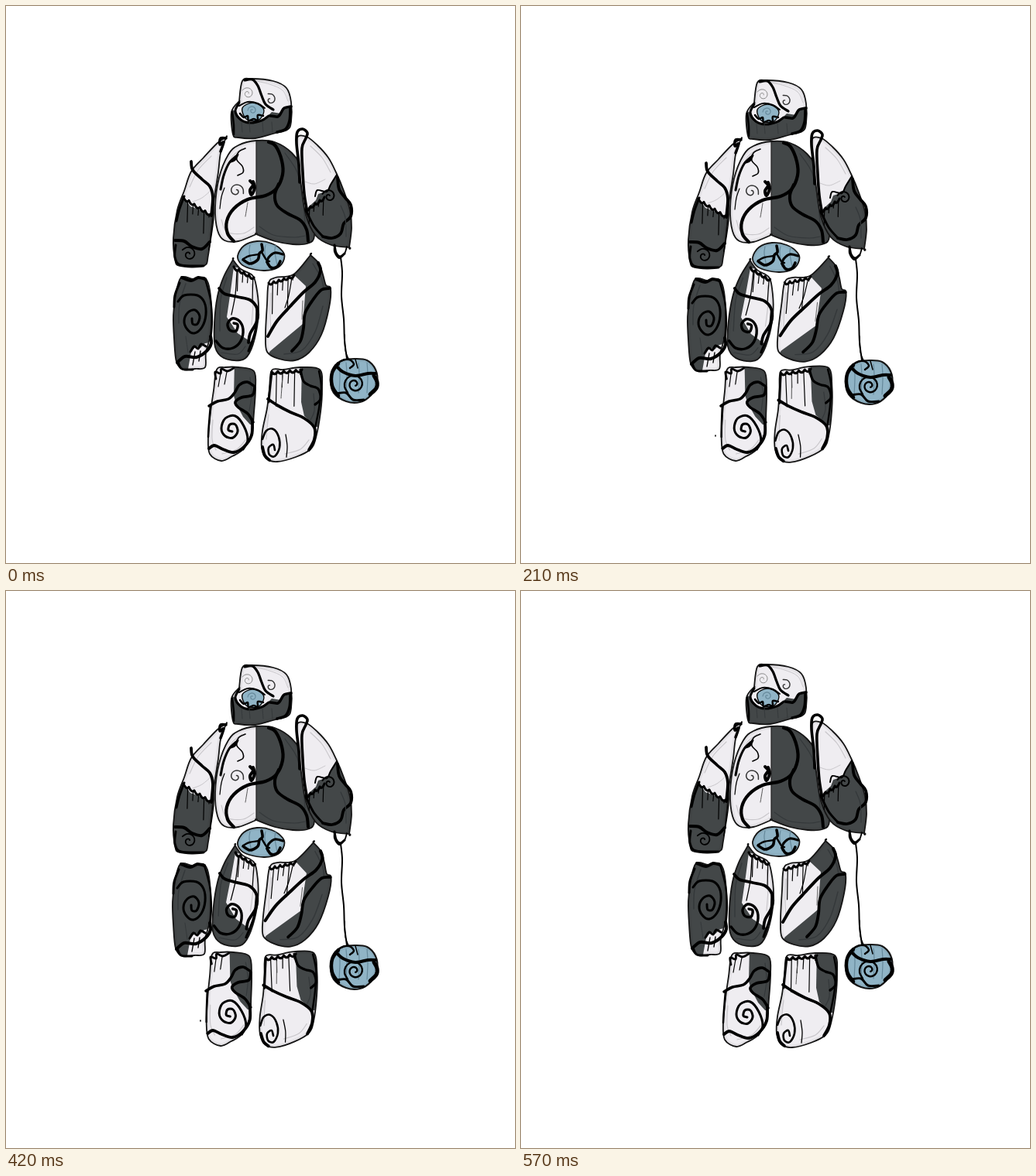
These frames come from a looping animation (657x720 px, 600 ms). An HTML page with a canvas:

```html
<!DOCTYPE html>
<html lang="en">
<head>
<meta charset="utf-8">
<title>Armour idle</title>
<style>
  html, body { margin: 0; width: 100%; height: 100%; overflow: hidden; background: #fff; }
  canvas { display: block; }
</style>
</head>
<body>
<canvas id="stage" width="657" height="720"></canvas>
<script>
const ctx = document.getElementById('stage').getContext('2d');
const WHITE = '#efedf1', DARK = '#434748', BLUE = '#90b4c6', INK = '#000';
const GREY = '#c9c7cb', SHADE = '#34383a', STEEL = '#66899b';
const LOOP = 600, RAD = Math.PI / 180;

const points = s => s.split(' ').map(p => p.split(',').map(Number));

// Smooth path through the given points; a doubled point makes a corner.
function curve(pts, closed) {
  const path = new Path2D(), n = pts.length;
  const at = i => closed ? pts[(i + n) % n] : pts[Math.max(0, Math.min(n - 1, i))];
  path.moveTo(...pts[0]);
  for (let i = 0; i < (closed ? n : n - 1); i++) {
    const [a, b, c, d] = [at(i - 1), at(i), at(i + 1), at(i + 2)];
    path.bezierCurveTo(b[0] + (c[0] - a[0]) / 6, b[1] + (c[1] - a[1]) / 6,
      c[0] - (d[0] - b[0]) / 6, c[1] - (d[1] - b[1]) / 6, c[0], c[1]);
  }
  if (closed) path.closePath();
  return path;
}

function stroke(path, width, color = INK) {
  ctx.lineWidth = width;
  ctx.strokeStyle = color;
  ctx.stroke(path);
}

const line = (width, s, color) => stroke(curve(points(s)), width, color);

// Plate with an outline, a base colour and an optional second colour area.
function plate(outline, base, tone, area, width = 1.8) {
  const path = curve(points(outline), true);
  ctx.fillStyle = base;
  ctx.fill(path);
  ctx.save();
  ctx.clip(path);
  if (tone) {
    ctx.fillStyle = tone;
    ctx.fill(new Path2D('M' + area + 'Z'));
  }
  stroke(path, 7, 'rgba(0,0,0,.05)');
  ctx.restore();
  stroke(path, width, '#151515');
}

function spiral(x, y, r, turns, start, width, color, dir = 1) {
  const pts = [], n = Math.ceil(turns * 10);
  for (let i = 0; i <= n; i++) {
    const k = i / n, a = start * RAD + dir * k * turns * 2 * Math.PI, d = r * (1 - .85 * k);
    pts.push([x + d * Math.cos(a), y + d * Math.sin(a)]);
  }
  stroke(curve(pts), width, color);
}

// Scalloped edge with thin lines running down from it.
function drips(x0, y0, x1, y1, n, length, width = 3) {
  const edge = new Path2D(), runs = new Path2D();
  const dx = (x1 - x0) / n, dy = (y1 - y0) / n;
  edge.moveTo(x0, y0);
  for (let i = 0; i < n; i++) {
    const x = x0 + dx * i, y = y0 + dy * i;
    edge.quadraticCurveTo(x + dx / 2, y + dy / 2 + 6, x + dx, y + dy);
    runs.moveTo(x + dx * .8, y + dy + 2);
    runs.lineTo(x + dx * .7, y + dy + length * (.55 + .45 * Math.sin(i * 2.4 + 1)));
  }
  stroke(edge, width);
  stroke(runs, 1.2);
}

function head() {
  plate('301,123 301,123 305,97 317,94 345,97 362,106 368,124 368,150 363,160 345,165 322,171 300,170 293,166 291,137',
    WHITE, DARK, '285,130 296,136 304,148 320,150 334,146 343,137 355,139 360,131 372,127 372,176 285,176');
  line(1, '318,96 340,101 357,109 364,123', GREY);
  spiral(312, 113, 8, 1.4, 210, 1, '#888');
  spiral(341, 121, 8, 1, 250, 1.4, '#333');
  const visor = curve(points('305,132 318,125 331,131 332,140 324,148 310,146'), true);
  ctx.fillStyle = BLUE;
  ctx.fill(visor);
  stroke(visor, 1.3);
  spiral(318, 135, 6, 1.3, 180, 1.2, STEEL);
  line(2.5, '302,139 307,144 312,142 313,148 320,146 325,148 325,141 332,142');
  line(3, '301,125 296,136 303,147 315,151 330,148 339,142');
  line(2, '301,129 312,124 325,126 334,132');
  line(3.2, '308,96 318,95 325,103 330,116 335,127 345,134');
  line(3.5, '341,142 351,143 355,138 359,132 368,130');
  line(3.5, '367,132 366,148 361,159 350,163');
  line(2.5, '292,137 294,154 294,166');
  for (const x of [304, 314, 331, 343]) line(1, `${x},150 ${x + 1},163`, SHADE);
}

function chest() {
  plate('323,174 300,180 287,192 275,222 270,260 273,290 282,303 300,304 323,295 323,295 347,304 370,308 389,307 398,297 392,260 385,215 369,190 347,176',
    WHITE, DARK, '323,165 323,312 410,312 410,165');
  line(1.2, '323,175 323,295', '#222');
  line(1.2, '305,184 291,196 281,222 278,250', GREY);
  line(1.2, '278,276 285,292 306,294 320,286', GREY);
  line(1.2, '327,285 345,296 372,299 386,297', SHADE);
  line(1.2, '360,190 376,215 383,250 386,280', SHADE);
  line(3, '297,194 288,203 281,219 277,237');
  line(3, '299,192 295,199 290,201');
  line(1.6, '309,184 300,189 298,199 305,207 306,215 299,219');
  spiral(297, 239, 10, 1.25, 20, 1.5, '#333', -1);
  line(4, '315,226 319,231 315,238 317,244 321,235 319,227');
  line(4.2, '339,176 348,181 356,200 357,218 349,236 335,245 312,250 294,262 285,278 286,294 294,304');
  line(4, '352,230 347,244 350,258 363,268 380,277 388,289 390,304');
  line(1.2, '282,235 278,247 276,262');
  line(1, '312,254 309,272', '#555');
}

function leftArm() {
  plate('284,170 284,170 273,177 255,196 239,214 230,239 221,264 216,300 218,326 224,336 255,336 261,322 266,280 269,247 274,215 277,190',
    WHITE, DARK, '210,240 229,246 238,259 249,263 258,268 275,269 275,345 210,345');
  line(1.2, '265,194 248,212 237,234', GREY);
  line(1, '241,253 253,248 265,238', GREY);
  line(3.5, '284,171 277,171 276,179 281,176 277,188');
  line(3.8, '239,201 241,212 253,224 263,233 267,247 265,271');
  drips(229, 247, 264, 269, 5, 30);
  line(3, '230,246 224,262 220,278');
  line(4, '218,303 230,304 240,311 253,314 263,305');
  line(3, '219,309 218,325 226,335 255,336');
  spiral(236, 321, 10, 1.3, 215, 1.8, INK);
  line(1.5, '266,240 268,273 262,315');
}

function rightArm() {
  plate('376,170 388,169 402,180 416,196 426,215 436,239 444,264 446,287 443,312 443,312 420,309 400,297 387,270 381,232 377,195',
    WHITE, DARK, '440,205 427,218 415,239 403,243 400,251 387,263 380,270 400,320 460,320 460,205');
  line(1.2, '393,181 408,196 419,215', GREY);
  line(1, '386,227 398,230 412,224', GREY);
  line(3.6, '379,228 378,205 375,178 376,163 383,159 389,164 387,171 382,184 383,215 385,243 388,262');
  drips(387, 263, 411, 247, 4, 24);
  line(2, '427,218 419,231 414,240 402,238 399,246');
  spiral(417, 246, 9, 1.3, 200, 2, INK);
  line(3.8, '428,222 430,237 438,248 445,257 445,272 436,281 432,294 421,300 409,298');
  line(3, '387,264 397,284 409,298');
  line(1.2, '432,258 438,274 439,298', SHADE);
  line(1.8, '424,309 424,318 430,326 437,320 440,311');
  line(3, '424,309 426,319 431,324 437,320');
  line(2, '432,325 434,345 433,375 436,405 437,432 440,456');
  line(1.4, '442,456 438,445 437,425');

  plate('450,456 466,458 477,470 479,487 471,503 457,512 439,511 423,500 419,484 423,467 435,458',
    BLUE, '', '', 2.2);
  for (const x of [430, 439, 455, 466]) line(1.2, `${x},461 ${x + 1},478 ${x},500`, STEEL);
  line(4.5, '429,462 421,474 421,491 429,504');
  line(4, '426,465 435,473 451,478 467,475 477,475');
  line(5, '475,478 479,486 478,494 470,502');
  line(3, '427,501 439,500 448,509 462,509');
  line(2.5, '425,467 432,459 443,457 449,463 444,468');
  line(1.5, '451,457 454,468');
  spiral(450, 489, 14, 1.8, 130, 2.4, INK);
}

function belt() {
  plate('299,323 307,310 324,304 343,307 357,317 359,327 351,338 334,342 314,339 303,333', BLUE, '', '', 1.8);
  for (const x of [315, 335, 348]) line(1.2, `${x},309 ${x - 1},318 ${x + 2},335`, STEEL);
  line(3.6, '306,328 315,333 325,328 327,320 331,316 330,308');
  line(2.4, '306,327 314,323 326,321');
  line(3.6, '337,331 342,338 350,337 354,330');
  line(3.2, '358,321 347,319 339,325 337,331');
  line(2.4, '330,318 336,328 340,330');
}

function forearm() {
  plate('226,351 242,353 256,351 262,362 265,390 264,424 258,448 257,467 244,469 229,470 220,460 217,430 216,400 219,374',
    DARK, WHITE, '234,475 239,447 245,440 251,442 257,436 270,434 270,475');
  line(4, '227,351 239,355 248,351 257,353');
  line(3, '224,358 218,374 217,389');
  line(1.4, '232,359 224,385 223,410', SHADE);
  line(3, '222,382 230,374 247,374 256,383 258,399 253,415 243,423 234,418 230,407 235,396 244,393 250,401 247,411 241,411 240,404');
  line(4, '221,461 231,453 246,454 259,446 265,436 264,427');
  line(3, '238,447 243,440 248,443 252,437 258,440');
  line(1.4, '244,447 241,464');
  line(1.4, '251,446 249,459');
  line(3, '222,460 227,469 241,470');
  line(2.2, '257,353 264,380 266,408 264,432');
  line(1, '232,427 235,448', SHADE);
}

function leftThigh() {
  plate('293,328 293,328 303,340 318,348 323,362 326,390 323,421 314,449 302,458 281,455 270,441 269,410 273,375 281,350',
    DARK, WHITE, '294,337 290,368 285,402 299,423 316,434 335,434 335,345 320,343 305,340');
  line(1.4, '285,351 277,380 276,420', SHADE);
  line(1.2, '317,359 319,382 317,412', GREY);
  drips(294, 337, 320, 351, 4, 30, 3.2);
  line(3.8, '275,365 282,372 299,376 315,380 324,391 324,407 315,424 313,435');
  line(3.4, '271,433 280,442 293,442 303,433 306,418 301,407 292,404 286,411 289,419 297,420 299,412 294,410');
  line(3, '324,390 322,419 313,446');
  line(1.3, '298,343 296,373 291,399');
  line(1.2, '278,448 299,450 309,440', SHADE);
}

function rightThigh() {
  plate('393,322 393,322 404,333 409,347 413,361 419,365 417,390 407,425 391,448 373,458 352,456 337,447 335,425 337,385 339,358 348,351 371,347',
    WHITE, DARK, '371,347 387,362 383,411 341,446 330,463 430,463 430,315 385,315');
  line(1.4, '396,333 407,352 410,367', SHADE);
  line(1.4, '409,388 399,421 382,445 359,450', SHADE);
  line(1.2, '342,371 341,397 342,420', GREY);
  drips(339, 358, 372, 348, 5, 45, 3);
  line(4, '403,332 406,342 399,357 384,370 367,388 350,407 338,427');
  line(3.8, '418,365 407,367 396,380 386,397 384,416 380,433 369,446');
  line(1.2, '369,351 365,374 360,390');
  line(1.2, '383,381 382,405', '#777');
}

function leftShin() {
  plate('272,470 283,467 300,467 320,472 322,495 320,526 317,552 306,573 292,582 278,588 263,579 261,557 264,525 268,497',
    WHITE, DARK, '295,460 294,504 297,514 306,531 315,541 330,542 330,460');
  line(1.2, '267,535 266,560 271,574', GREY);
  line(1.2, '279,579 298,573 309,561', GREY);
  line(1.2, '315,480 317,502 314,523', SHADE);
  line(2.8, '271,482 270,473 277,475 278,469 286,472 294,468');
  line(1.2, '285,473 282,489');
  line(1.2, '277,475 274,492');
  line(3.5, '262,517 273,511 287,508 295,500 301,490 311,486 320,491');
  line(3.6, '321,493 318,503 304,506 296,512 300,519 312,527 319,538');
  line(3.8, '318,535 317,555 307,570 294,577 280,573 269,568 262,572');
  line(3, '306,573 312,561 307,543 296,530 283,533 278,546 283,556 293,558 299,550 296,541 289,541 287,548 292,550');
  line(2.5, '264,516 262,540 261,557');
}

function rightShin() {
  plate('343,471 358,470 380,467 405,470 408,495 406,525 400,558 393,573 374,583 350,589 336,585 330,571 331,549 337,520 340,495',
    WHITE, DARK, '382,460 381,512 385,530 400,544 420,545 420,460');
  line(1.2, '339,528 337,545 336,560', GREY);
  line(1.2, '360,579 380,573 391,561', GREY);
  line(1.2, '397,501 398,523 393,535', SHADE);
  drips(343, 473, 382, 470, 5, 48, 3.2);
  line(2.8, '343,474 341,492 339,512');
  line(3.8, '338,508 350,516 367,525 385,533 398,545 398,560 391,574');
  line(3.2, '380,470 384,485 393,491 403,495 406,508 399,515');
  line(2.4, '404,472 407,493 404,520 399,545');
  line(2.6, '331,560 336,549 345,547 352,557 353,571 347,582 340,580 339,571 345,567 347,574');
  line(3.8, '331,570 334,581 340,587');
  line(1.3, '361,554 363,569 362,583');
  line(1, '357,478 355,507', '#555');
}

function speck() {
  line(1.6, '251,555 251,556');
}

// Each pose: x, y, turn in degrees, sideways shear. The first pair is "mid", the second "low".
const parts = [
  { draw: forearm, mid: [-1, 2], low: [-1, 3] },
  { draw: leftThigh, pivot: [297, 392], mid: [-.5, 1, 2.8], low: [-1.5, 1, 3] },
  { draw: rightThigh, pivot: [377, 390], mid: [-1, 2, 4], low: [-2, 2, 4.5] },
  { draw: leftShin, pivot: [285, 588], mid: [-1, 0, 0, .043], low: [-3, 0, 0, .06] },
  { draw: rightShin, pivot: [345, 590], mid: [-1, 1, -3.3], low: [-2, 1, -5.2] },
  { draw: belt, mid: [0, 2], low: [2, 6] },
  { draw: chest, mid: [0, 1], low: [0, 7] },
  { draw: leftArm, mid: [0, 2], low: [0, 6] },
  { draw: rightArm, mid: [0, 2], low: [0, 7] },
  { draw: head, mid: [0, 2], low: [0, 5] },
  { draw: speck, mid: [0, 0], low: [-6, -1], hidden: true }
];

function poseAt(t) {
  if (t < 120) return 'rest';
  if (t < 270) return 'mid';
  if (t < 420) return 'low';
  return t < 570 ? 'mid' : 'settle';
}

function render(now) {
  const pose = poseAt(now % LOOP);
  ctx.fillStyle = '#fff';
  ctx.fillRect(0, 0, 657, 720);
  ctx.lineCap = ctx.lineJoin = 'round';
  for (const part of parts) {
    if (part.hidden && !part[pose]) continue;
    const [x, y, turn = 0, shear = 0] = part[pose] || [0, pose === 'settle' ? 1 : 0];
    const [px, py] = part.pivot || [0, 0];
    ctx.save();
    ctx.translate(px + x, py + y);
    ctx.rotate(turn * RAD);
    ctx.transform(1, 0, shear, 1, 0, 0);
    ctx.translate(-px, -py);
    part.draw();
    ctx.restore();
  }
}

const start = performance.now();
function tick() {
  render(performance.now() - start);
  requestAnimationFrame(tick);
}
tick();
</script>
</body>
</html>
```
